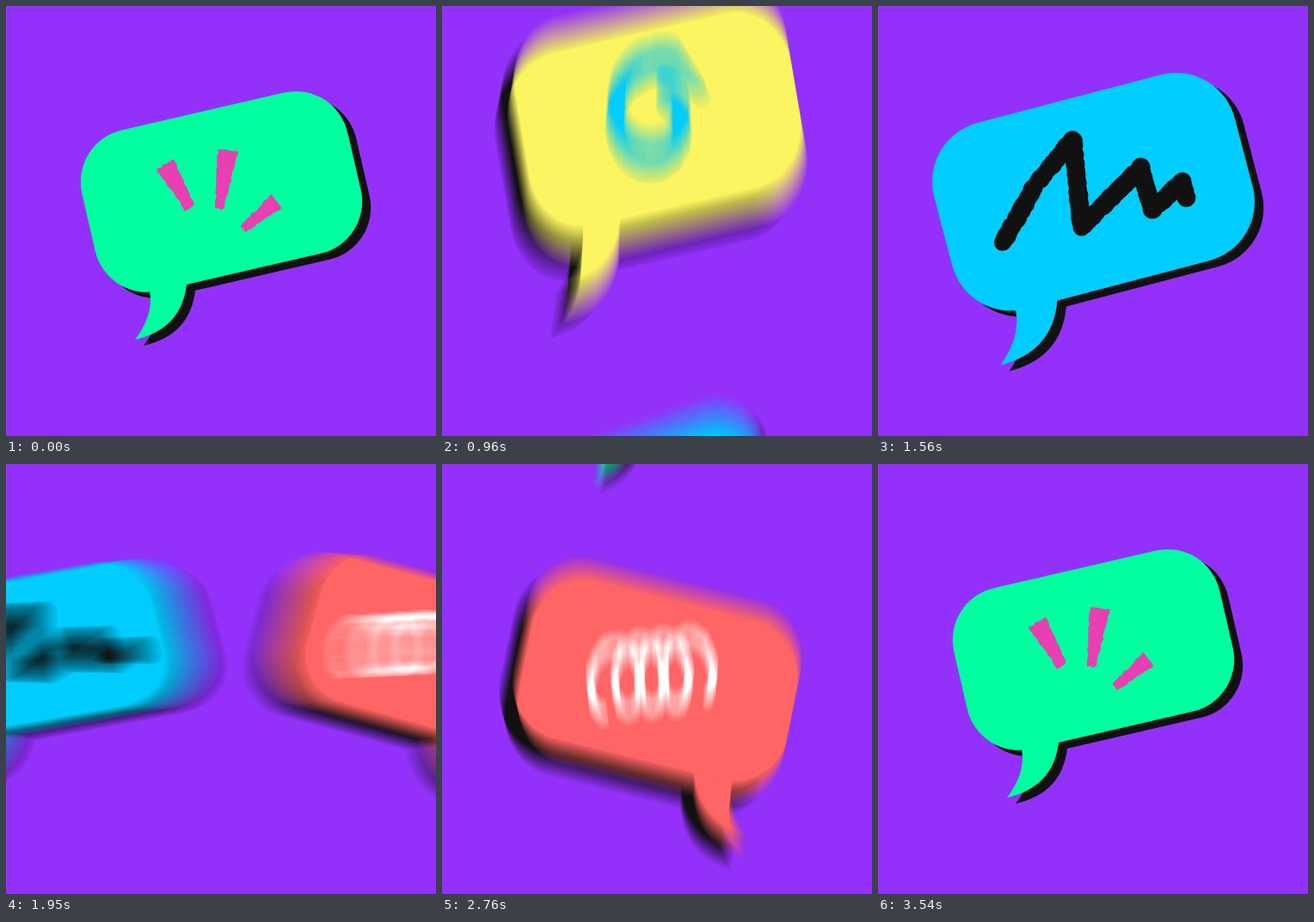
Recreate the animation shown at these times as an HTML page with a canvas. Size 500 by 500 pixels, loop 3.6 s.

```html
<!DOCTYPE html>
<html lang="en">
<head>
<meta charset="utf-8">
<title>Speech bubbles</title>
<style>
  html, body { margin: 0; width: 100%; height: 100%; overflow: hidden; background: #9331fa; }
  canvas { display: block; width: 100vw; height: 100vh; object-fit: contain; }
</style>
</head>
<body>
<canvas id="stage" width="500" height="500"></canvas>
<script>
const ctx = document.getElementById('stage').getContext('2d');
const LOOP = 3600, STEP = 30, SAMPLES = 20, SLIDE = 350;
const CX = 250.5, CY = 216;

// Each slide moves one bubble out and the next one in
const slides = [
  { from: 20, x: 1, y: 0, dist: 450 },
  { from: 862, x: 0, y: -1, dist: 450 },
  { from: 1778, x: -1, y: 0, dist: 430 },
  { from: 2693, x: 0, y: 1, dist: 390 }
];

// size: first, peak and resting zoom; ref: zoom and tilt at which the art is laid out
const green = { fill: '#00ff9f', ink: '#e83fb2', h: 192, tilt: -13, shadow: [10, 7],
  grow: SLIDE, size: [0.82, 1.11, 1], ref: 1, art: rays };
const bubbles = [
  green,
  { fill: '#faf560', ink: '#00ccff', h: 209, tilt: -12, shadow: [-13, 14],
    grow: 520, size: [0.82, 1.19, 1.18], ref: 1.13, art: spiral },
  { fill: '#00ccff', ink: '#111111', h: 196, tilt: -14.7, shadow: [9, 6],
    grow: 520, size: [0.82, 1.15, 1.14], ref: 1.03, art: zigzag },
  { fill: '#ff6565', ink: '#ffffff', h: 192, tilt: 13, shadow: [-14, 13], flip: true,
    grow: 450, size: [0.82, 1.18, 1.1], ref: 1.02, art: coil },
  green
];

const clamp = v => Math.min(1, Math.max(0, v));
const mix = (a, b, p) => a + (b - a) * p;
const ease = p => (1 - Math.cos(Math.PI * clamp(p))) / 2;
const phase = (slide, t) => clamp((t - slide.from) / SLIDE);
const noise = n => { const v = Math.sin(n * 127.1 + 3.7) * 43758.5453; return (v - Math.floor(v)) * 2 - 1; };
const boil = t => Math.floor((t + 90) / 150) % 4;

// Evenly spaced points along straight legs
function polyline(pts, gap = 1.5) {
  return pts.slice(1).flatMap(([x, y], i) => {
    const [px, py] = pts[i], n = Math.ceil(Math.hypot(x - px, y - py) / gap);
    return Array.from({ length: n }, (_, k) => [mix(px, x, k / n), mix(py, y, k / n)]);
  });
}

const curve = (n, fn) => Array.from({ length: n }, (_, i) => fn(i / (n - 1)));

const spiralLine = curve(200, p => {
  const a = (438 * p - 68) * Math.PI / 180, r = 32 + 8 * p + 40 * p * p;
  return [247 + r * Math.cos(a), 212 + r * Math.sin(a)];
});
const zigzagLine = polyline([[155, 270], [190, 208], [229, 161], [238, 253], [300, 191], [312, 235], [344, 205], [348, 224]]);
const coilLine = curve(190, p => {
  const u = 3.9 * p, a = u * 2 * Math.PI;
  return [188 + 28 * u - 22 * Math.sin(a), 215 + 35 * Math.cos(a) - 3 * u];
});

function brush(pts, r, seed) {
  ctx.beginPath();
  pts.forEach(([x, y], i) => {
    const n = i + seed * 71, pr = r + noise(n) * 0.9;
    const px = x + noise(n + 0.37) * 0.5, py = y + noise(n + 0.71) * 0.5;
    ctx.moveTo(px + pr, py);
    ctx.arc(px, py, pr, 0, 7);
  });
  ctx.fill();
}

// Tapered stroke with ragged edges
function ray(x0, y0, x1, y1, w0, w1, seed) {
  const len = Math.hypot(x1 - x0, y1 - y0), nx = (y0 - y1) / len / 2, ny = (x1 - x0) / len / 2;
  const corners = [
    [x0 + nx * w0, y0 + ny * w0], [x1 + nx * w1, y1 + ny * w1],
    [x1 - nx * w1, y1 - ny * w1], [x0 - nx * w0, y0 - ny * w0]
  ];
  ctx.beginPath();
  polyline([...corners, corners[0]], 4).forEach(([x, y], i) =>
    ctx.lineTo(x + noise(i + seed * 53), y + noise(i + seed * 53 + 0.4)));
  ctx.fill();
}

function rays(t) {
  const pose = t >= 3330 ? (1 + Math.floor((t - 3330) / 70)) % 4 : 0;
  const grow = 1 + 0.08 * Math.sin(pose * Math.PI / 4);
  ctx.translate(250, 262);
  ctx.scale(grow, grow);
  ctx.translate(-250, -262);
  ray(185, 184, 214, 235, 24, 12, pose + 1);
  ray(258, 168, 248, 236, 23, 10, pose + 5);
  ray(314, 227, 276, 259, 20, 9, pose + 9);
}
function spiral(t, leave) {
  const shown = 1 - 0.8 * ease(leave);
  brush(spiralLine.slice(0, Math.ceil(spiralLine.length * shown)), 10.8, boil(t));
}
function zigzag(t) { brush(zigzagLine, 9.2, boil(t)); }
function coil(t) { brush(coilLine, 5.2, boil(t)); }

function bubblePath(h) {
  const b = h / 2, p = new Path2D();
  p.moveTo(-107.5, b - 4);
  p.lineTo(-107.5, b);
  p.quadraticCurveTo(-109.3, b + 26, -136.6, b + 49);
  p.quadraticCurveTo(-81.3, b + 49.4, -63.7, b);
  p.lineTo(-63.7, b - 4);
  p.closePath();
  const body = new Path2D();
  body.roundRect(-158.5, -b, 317, h, 62);
  return [p, body];
}
bubbles.forEach(b => b.paths = bubblePath(b.h));

function zoom(b, t, since) {
  const [first, peak, rest] = b.size;
  return t < since + b.grow
    ? mix(first, peak, ease((t - since) / b.grow))
    : mix(peak, rest, ease((t - since - b.grow) / 200));
}

function drawBubble(b, t, tick, into, out) {
  const enter = into ? phase(into, t) : 1, leave = out ? phase(out, t) : 0;
  const away = 1 - ease(enter), gone = ease(leave);
  let x = CX, y = CY, stretch = 1;
  if (into) {
    x -= into.x * into.dist * away;
    y -= into.y * into.dist * away;
  }
  if (out) {
    x += out.x * out.dist * gone;
    y += out.y * out.dist * gone;
    // A leaving bubble is pulled along its way
    stretch = 1 + 0.1 * Math.sin(Math.PI * leave);
    if (out.x) stretch = 1 / stretch;
  }
  const z = (into ? zoom(b, t, into.from) : b.size[2]) * (1 - 0.3 * gone);
  const sx = z / stretch, sy = z * stretch;
  const turn = b.tilt * 0.35 * (away - gone), rad = Math.PI / 180;

  const body = (dx, dy, fill) => {
    ctx.save();
    ctx.translate(x + dx * z, y + dy * z);
    ctx.scale(sx, sy);
    ctx.rotate((b.tilt + turn) * rad);
    if (b.flip) ctx.scale(-1, 1);
    ctx.fillStyle = fill;
    b.paths.forEach(p => ctx.fill(p));
    ctx.restore();
  };
  body(...b.shadow, '#111111');
  body(0, 0, b.fill);

  ctx.save();
  ctx.translate(x, y);
  ctx.scale(sx / b.ref, sy / b.ref);
  ctx.rotate(turn * rad);
  ctx.translate(-CX, -CY);
  ctx.fillStyle = b.ink;
  b.art(tick, leave);
  ctx.restore();
}

function drawScene(t, tick) {
  ctx.fillStyle = '#9331fa';
  ctx.fillRect(0, 0, 500, 500);
  bubbles.forEach((b, i) => {
    const into = slides[i - 1], out = slides[i];
    if (into && t < into.from || out && t > out.from + SLIDE) return;
    drawBubble(b, t, tick, into, out);
  });
}

// Motion blur: average several moments of one shutter interval
const view = ctx.canvas;
const sum = document.createElement('canvas');
sum.width = sum.height = 500;
const sumCtx = sum.getContext('2d');

function render(tick) {
  for (let i = 0; i < SAMPLES; i++) {
    drawScene(Math.max(0, tick + ((i + 0.5) / SAMPLES - 0.5) * STEP), tick);
    sumCtx.globalAlpha = 1 / (i + 1);
    sumCtx.drawImage(view, 0, 0);
  }
  ctx.drawImage(sum, 0, 0);
}

const start = performance.now();
let shown = 0;
function frame() {
  const t = (performance.now() - start) % LOOP;
  const tick = Math.min(3540, Math.floor(t / STEP) * STEP);
  if (tick !== shown) render(shown = tick);
  requestAnimationFrame(frame);
}
render(0);
requestAnimationFrame(frame);
</script>
</body>
</html>
```
